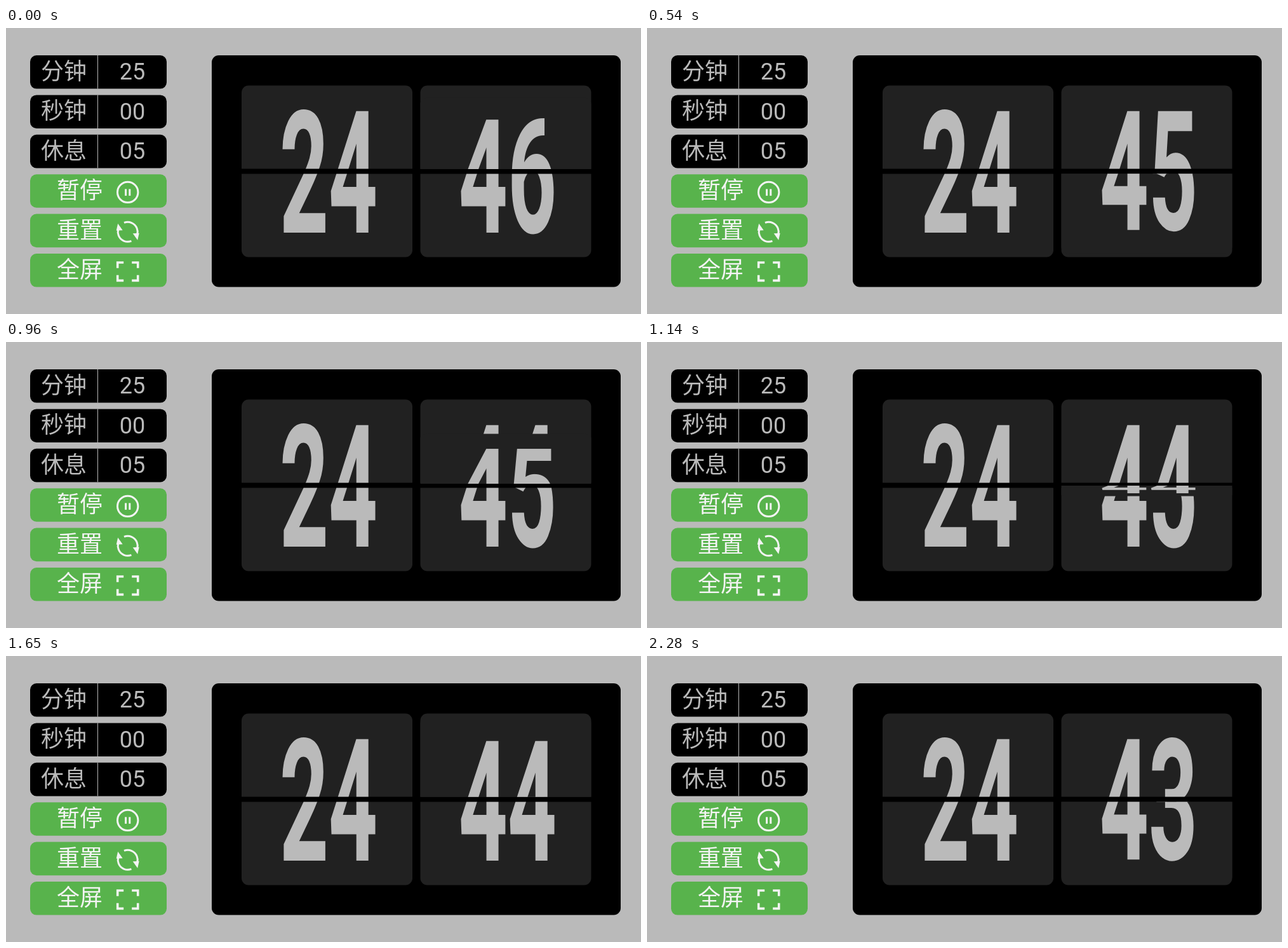
An HTML page with a canvas that plays this animation: 1000 by 450 pixels, repeating every 2.31 s.

```html
<!DOCTYPE html>
<html lang="zh">
<head>
<meta charset="utf-8">
<title>Flip timer</title>
<style>
  html, body { margin: 0; width: 100%; height: 100%; overflow: hidden; background: #bababa; }
  canvas { display: block; width: 1000px; height: 450px; }
</style>
</head>
<body>
<canvas id="stage" width="1000" height="450"></canvas>
<script>
const ctx = document.getElementById('stage').getContext('2d');

const GREY = '#bababa', GREEN = '#58b34c', WHITE = '#f4f4f4', PANEL = '#212121';
const LABEL_FONT = '36px Roboto, "Noto Sans CJK SC", "Noto Sans CJK", sans-serif';
const DIGIT_FONT = 'bold 134.5px Roboto, sans-serif';
const LOOP = 2310, STEP = 30, FLIP = 735;
const HINGE = 225.5, GAP = 4, CARD_W = 269, CARD_H = 135;

// Start time of each flip and the value it leaves
const flips = [
  { at: -126, from: 46 },
  { at: 743, from: 45 },
  { at: 1589, from: 44 }
];

function box(x, y, w, h, r, color) {
  ctx.beginPath();
  ctx.roundRect(x, y, w, h, r);
  ctx.fillStyle = color;
  ctx.fill();
}

function label(text, x, y, color) {
  ctx.font = LABEL_FONT;
  ctx.textAlign = 'center';
  ctx.fillStyle = color;
  ctx.fillText(text, x, y);
}

const rowTop = i => 43 + 62.4 * i;

function field(i, name, value) {
  const y = rowTop(i);
  box(38, y, 215, 52.6, 10, '#000');
  ctx.fillStyle = GREY;
  ctx.fillRect(144, y, 1, 52.6);
  label(name, 91, y + 38, GREY);
  label(value, 199, y + 38.3, GREY);
}

function button(i, name, icon) {
  const y = rowTop(i);
  box(38, y, 215, 52.6, 10, GREEN);
  label(name, 116, y + 38, WHITE);
  ctx.save();
  ctx.translate(191.7, y + 28.2);
  ctx.fillStyle = ctx.strokeStyle = WHITE;
  icon();
  ctx.restore();
}

function pauseIcon() {
  ctx.lineWidth = 3;
  ctx.beginPath();
  ctx.arc(0, 0, 16.2, 0, 2 * Math.PI);
  ctx.stroke();
  ctx.fillRect(-4.6, -5, 3, 10.5);
  ctx.fillRect(1.6, -5, 3, 10.5);
}

function resetIcon() {
  ctx.lineWidth = 3;
  for (let k = 0; k < 2; k++) {
    ctx.beginPath();
    ctx.arc(0, 0, 15.5, -1.95, 0.25);
    ctx.stroke();
    ctx.beginPath();
    ctx.moveTo(8, 2.5);
    ctx.lineTo(18, 2);
    ctx.lineTo(15.5, 13);
    ctx.fill();
    ctx.rotate(Math.PI);
  }
}

function fullscreenIcon() {
  ctx.lineWidth = 3.6;
  for (const sx of [-1, 1]) for (const sy of [-1, 1]) {
    ctx.beginPath();
    ctx.moveTo(sx * 6.5, sy * 14.2);
    ctx.lineTo(sx * 16, sy * 14.2);
    ctx.lineTo(sx * 16, sy * 5.5);
    ctx.stroke();
  }
}

// One half of a card, squeezed towards the hinge by s
function half(card, text, upper, s = 1) {
  ctx.save();
  ctx.translate(0, HINGE);
  ctx.scale(1, s);
  ctx.beginPath();
  if (upper) ctx.roundRect(card.x, -CARD_H, CARD_W, CARD_H - GAP, [11, 11, 0, 0]);
  else ctx.roundRect(card.x, GAP, CARD_W, CARD_H - GAP, [0, 0, 11, 11]);
  ctx.fillStyle = PANEL;
  ctx.fill();
  ctx.clip();
  ctx.scale(1, 2);
  ctx.font = DIGIT_FONT;
  ctx.textAlign = 'center';
  ctx.fillStyle = GREY;
  ctx.fillText(text, card.mid, 48.2);
  ctx.restore();
}

const minutes = { x: 371, mid: 508 };
const seconds = { x: 652.5, mid: 790 };

function drawSeconds(t) {
  const flip = flips.findLast(f => f.at <= t);
  const angle = Math.min(1, (t - flip.at) / FLIP) * Math.PI;
  const s = Math.cos(angle);
  const next = flip.from - 1;
  half(seconds, next, true);
  half(seconds, angle < Math.PI ? flip.from : next, false);
  if (s > 0) half(seconds, flip.from, true, s);
  else if (angle < Math.PI) half(seconds, next, false, -s);
}

function draw(t) {
  ctx.fillStyle = GREY;
  ctx.fillRect(0, 0, 1000, 450);
  field(0, '分钟', '25');
  field(1, '秒钟', '00');
  field(2, '休息', '05');
  button(3, '暂停', pauseIcon);
  button(4, '重置', resetIcon);
  button(5, '全屏', fullscreenIcon);
  box(324, 43, 644, 364.5, 11, '#000');
  half(minutes, 24, true);
  half(minutes, 24, false);
  drawSeconds(t);
}

const start = performance.now();

function tick() {
  const t = (performance.now() - start) % LOOP;
  draw(Math.floor(t / STEP) * STEP);
  requestAnimationFrame(tick);
}
tick();
</script>
</body>
</html>
```
